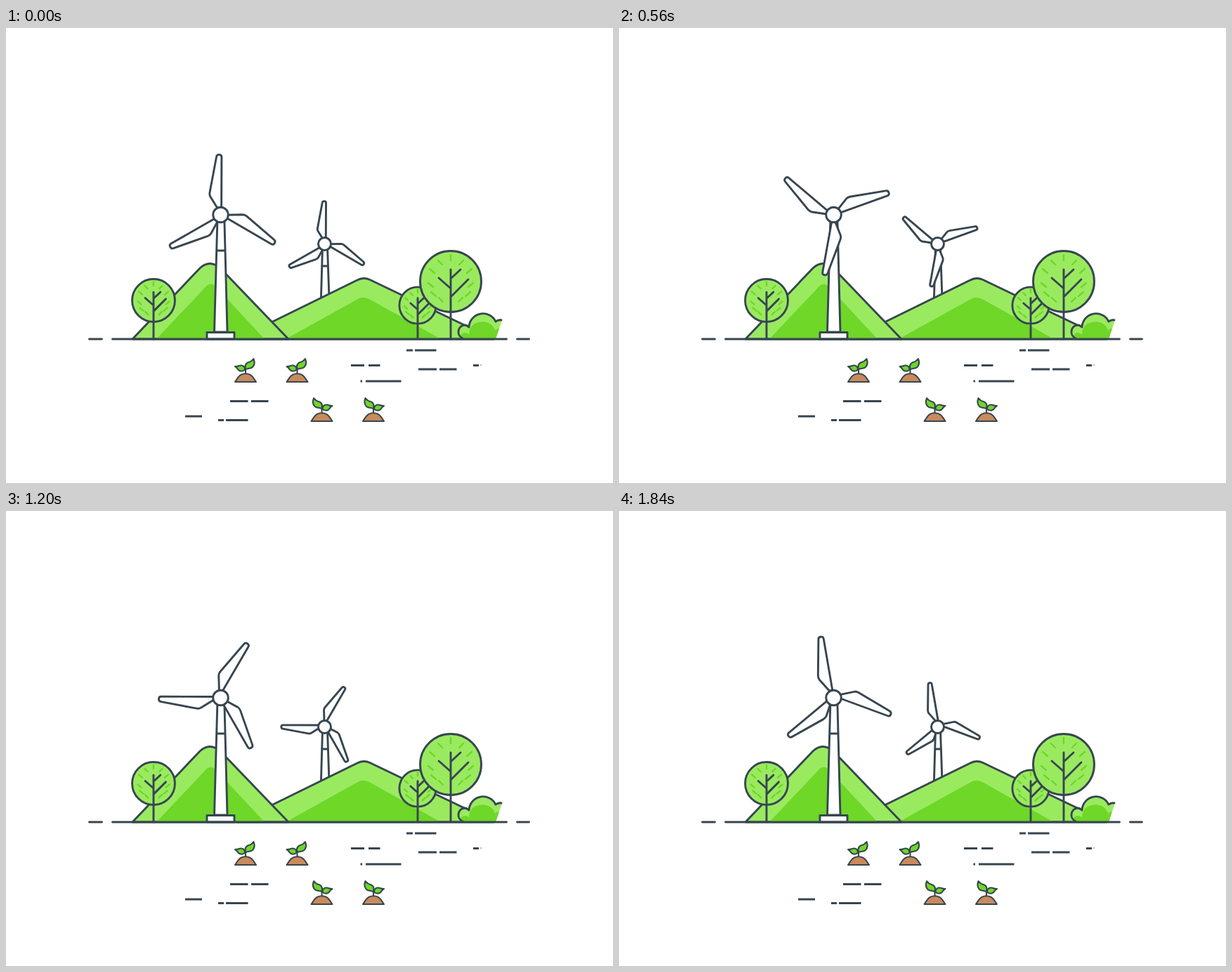
An HTML page that plays this animation: 864 by 648 pixels, repeating every 1920 ms.

```html
<!DOCTYPE html>
<html lang="en">
<head>
<meta charset="utf-8">
<title>Wind turbines</title>
<style>
  html, body { margin: 0; width: 100%; height: 100%; overflow: hidden; background: #fff; }
  svg { display: block; width: 864px; height: 648px; }
  path, circle { vector-effect: non-scaling-stroke; }
  .line { fill: none; stroke: #374650; }
  .white { fill: #fff; stroke: #374650; }
  .light { fill: #9aea60; }
  .dark { fill: #6ed728; }
  .edge { stroke: #374650; }
  .soil { fill: #c98a5c; stroke: #374650; }
</style>
</head>
<body>
<svg viewBox="0 0 864 648" stroke-width="2.9" stroke-linecap="round" stroke-linejoin="round">
  <defs>
    <path id="blade" class="white" d="M-7-82.500Q-6.600-85.800-3.300-85.800Q.4-85.800.4-82.500L.1-8H-4.500L-15.600-26Q-17-28.500-16.500-32Z"/>
    <g id="rotor">
      <use href="#blade"/>
      <use href="#blade" transform="rotate(120)"/>
      <use href="#blade" transform="rotate(240)"/>
    </g>
    <path id="ticks" d="M-18-30L-12-24M-30-18L-23-12M-32 2L-25 8M-28 15L-21 21M-17 23L-11 29"/>
    <g id="crown">
      <circle class="light edge" r="43.500"/>
      <g fill="none" stroke="#6ed728" stroke-width="2.400">
        <path d="M0-38V-30"/>
        <use href="#ticks"/>
        <use href="#ticks" transform="scale(-1 1)"/>
      </g>
      <path class="line" d="M0-17V42M-17-5L0 10M14-17L0-4M25-3L0 22"/>
    </g>
    <g id="sprout" stroke-width="2.100">
      <path class="line" d="M0-12V-18"/>
      <path class="dark edge" d="M-1-17.500C-3-14.500-9-14.500-11-18C-12.500-20.500-13-21-15-22C-11-21.500-9-24-6-23.500C-3-23-1-21-1-17.500Z"/>
      <path class="dark edge" d="M0-18C-1-22 0-26 3-27.500C7-28.500 9-29.500 11.500-33C13-29 13-24 10-21C7-18.500 3-19.500 0-18Z"/>
      <path class="soil" d="M-15 0L-11-6Q-7-11.800 0-11.800Q7-11.800 11-6L15 0Z"/>
    </g>
  </defs>

  <!-- far turbine and hills -->
  <path class="white" d="M450.500 312L448 400H460.500L457.500 312ZM449.500 339H458.500"/>
  <path class="light edge" d="M329 443L499 359.500Q508.500 354 518 358.500L694 443Z"/>
  <path class="dark" d="M398 443L499 387Q508.500 381 518 386.500L619 443Z"/>
  <path class="light edge" d="M180 443L276 342Q290 329 305 342L402 443Z"/>
  <path class="dark" d="M214 443L282 371Q291 359 300 370L368 443Z"/>
  <g id="far"><use href="#rotor" transform="translate(455.200 307.700) scale(.712)"/></g>
  <circle class="white" cx="453.500" cy="307.500" r="9"/>

  <!-- near turbine -->
  <path class="white" d="M301 270L296.500 433H315L310.800 270ZM300 317H312M286 433.500H325V443H286Z"/>
  <g id="near"><use href="#rotor" transform="translate(306.500 266.200)"/></g>
  <circle class="white" cx="305.500" cy="266" r="10.800"/>

  <!-- trees and bush -->
  <path class="line" d="M210 410V443M586 415V443"/>
  <use href="#crown" transform="translate(210 388) scale(.7)"/>
  <use href="#crown" transform="translate(586 395) scale(.6)"/>
  <path class="light" d="M650 443A10 10 0 0 1 652 423Q656 423 659 426A20 20 0 0 1 697 418Q701 415 706 416L697 443Z"/>
  <path class="dark" d="M646 443Q647 434 653 434Q657 434 659 437Q659 426 667 421Q680 415 690 422Q695 426 696 431Q698 428 702 428L697 443Z"/>
  <path class="line" d="M650 442A10 10 0 0 1 652 423Q656 423 659 426A20 20 0 0 1 697 418Q701 415 705 416"/>
  <path class="line" d="M633 402V443"/>
  <use href="#crown" transform="translate(633 361)"/>

  <!-- ground and furrows -->
  <path class="line" d="M118.500 443H136.500M151.500 443H712.500M727.500 443H744.500"/>
  <path class="line" stroke-linecap="butt" d="M570 459H579M582 459H612.500M491 480.500H510M516 480.500H532.500M665 480.500H673M587 486H613M617 486H641.500M504.500 503H507M512 503H562.500M319 531.500H344.500M349 531.500H373.500M255 553H279M302 558.500H310M313 558.500H344.500"/>
  <circle cx="676" cy="480" r=".7" fill="#374650"/>
  <use href="#sprout" x="341" y="504"/>
  <use href="#sprout" x="414.500" y="504"/>
  <use href="#sprout" transform="translate(449.500 560) scale(-1 1)"/>
  <use href="#sprout" transform="translate(523 560) scale(-1 1)"/>
</svg>
<script>
  const near = document.getElementById('near');
  const far = document.getElementById('far');
  const step = 80, loop = 1920;

  // The pivots sit slightly off the hubs, so the rotors wobble.
  function draw(now) {
    const angle = Math.floor(now % loop / step) * 10;
    near.setAttribute('transform', `rotate(${angle} 305.1 265)`);
    far.setAttribute('transform', `rotate(${angle} 454.4 306.1)`);
    requestAnimationFrame(draw);
  }
  draw(performance.now());
</script>
</body>
</html>
```
